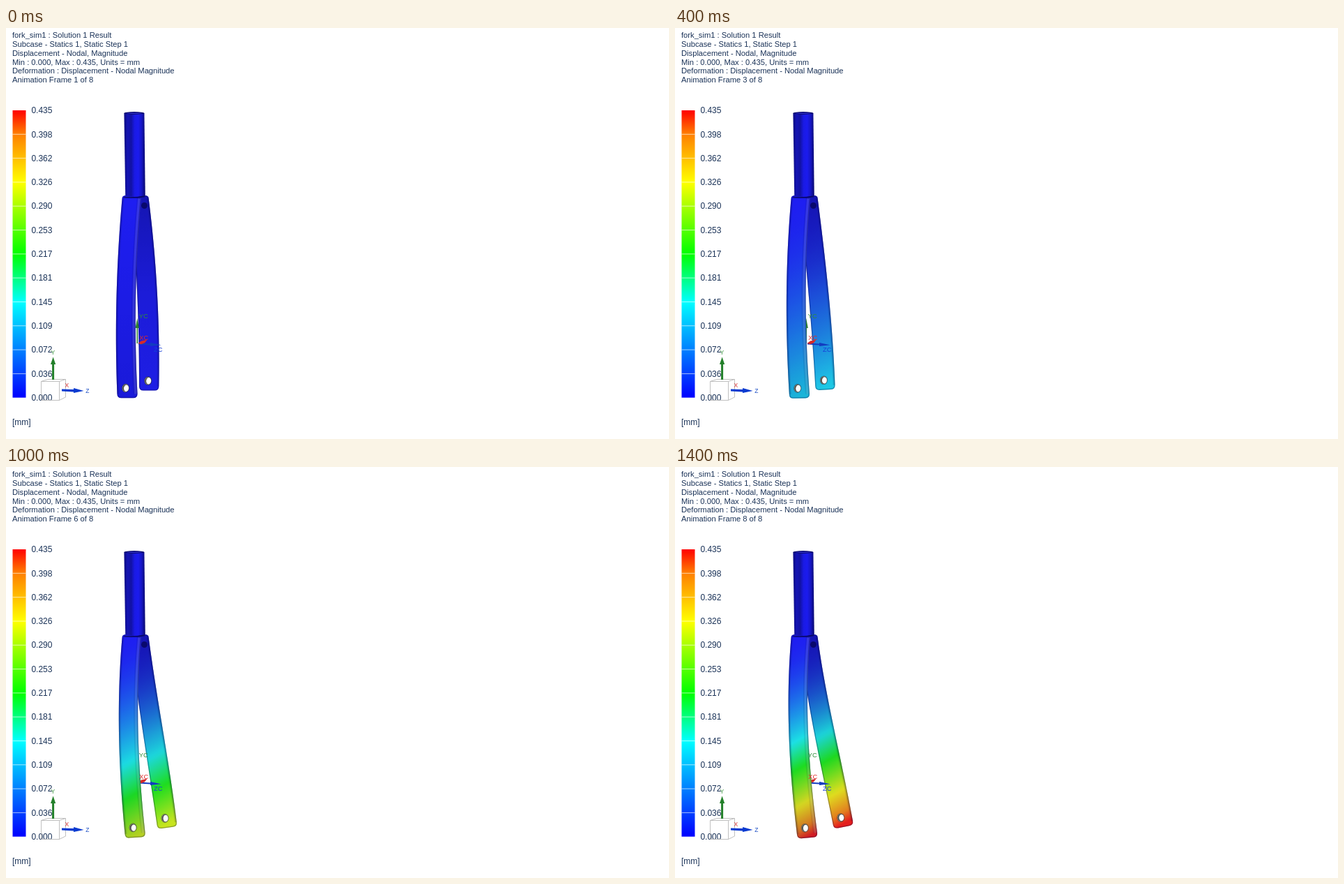
Recreate the animation shown at these times as an HTML page with a canvas. Size 951x589 px, loop 1.6 s.

```html
<!DOCTYPE html>
<html lang="en">
<head>
<meta charset="utf-8">
<title>Fork displacement</title>
<style>
  html, body { margin: 0; width: 100%; height: 100%; overflow: hidden; background: #fff; }
  canvas, svg { position: absolute; left: 0; top: 0; width: 951px; height: 589px; }
  text { font-family: "Liberation Sans", Arial, sans-serif; white-space: pre; }
  .ink { fill: #1b3358; }
</style>
</head>
<body>
<canvas id="view" width="951" height="589"></canvas>
<svg viewBox="0 0 951 589">
  <defs><linearGradient id="scale" x1="0" y1="1" x2="0" y2="0"></linearGradient></defs>
  <rect x="9.5" y="118" width="19" height="411.7" fill="url(#scale)"/>
  <g id="ticks" stroke="#fff" stroke-opacity=".65"></g>
  <g id="words" class="ink"></g>
  <path d="M50.5 506.5H76.5V533.5H50.5ZL60 503.5H85.5L76.5 506.5M85.5 503.5V529L76.5 533.5"
    fill="none" stroke="#b9b9b9" stroke-width=".9"/>
  <path d="M66.1 504V482H64L67.6 471.5L71.2 482H69.1V504Z" fill="#23802a"/>
  <path d="M80 517.4L97 518V516L111.5 520L97 523V521.4L80 520.6Z" fill="#0b3bd0"/>
  <g font-size="8.5">
    <text x="64.6" y="468" fill="#3c9440">Y</text>
    <text x="84.6" y="515" fill="#d83434">X</text>
    <text x="114.2" y="523" fill="#1d4fc4">Z</text>
  </g>
  <g font-size="9.3">
    <text x="190.8" y="416" fill="#2f8f3a">YC</text>
    <text x="191.2" y="447.3" fill="#e02a2a">XC</text>
    <text x="212" y="464" fill="#1740d8">ZC</text>
  </g>
</svg>
<script>
const STEPS = 8, STEP_MS = 200, TOP = 240;
const ctx = document.getElementById('view').getContext('2d');

// Colour scale: value, then red, green, blue
const RAMP = [[0, 0, 0, 255], [1 / 3, 0, 255, 255], [1 / 2, 0, 255, 0],
  [3 / 4, 255, 255, 0], [11 / 12, 255, 128, 0], [1, 255, 0, 0]];
function hue(v, gain = 1, lift = 0) {
  const i = Math.max(1, RAMP.findIndex(r => r[0] >= v));
  const [t0, ...a] = RAMP[i - 1], [t1, ...b] = RAMP[i];
  const k = (v - t0) / (t1 - t0);
  return `rgb(${a.map((c, j) => Math.round((c + (b[j] - c) * k) * gain + lift))})`;
}

// Text and legend
function add(parent, tag, attrs, text = '') {
  const el = document.createElementNS('http://www.w3.org/2000/svg', tag);
  for (const k in attrs) el.setAttribute(k, attrs[k]);
  el.textContent = text;
  return document.getElementById(parent).appendChild(el);
}
const write = (text, x, y, size) => add('words', 'text', { x, y, 'font-size': size }, text);
const header = [
  'fork_sim1 : Solution 1 Result',
  'Subcase - Statics 1, Static Step 1',
  'Displacement - Nodal, Magnitude',
  'Min : 0.000, Max : 0.435, Units = mm',
  'Deformation : Displacement - Nodal Magnitude',
  ''
].map((t, i) => write(t, 9, 14 + i * 12.87, 11.2));
const counter = header.at(-1);
for (let i = 0; i <= 12; i++) {
  const y = 118 + i * 34.31;
  write((0.43455 * (12 - i) / 12).toFixed(3), 36.4, y + 4.2, 12);
  if (i && i < 12) add('ticks', 'path', { d: `M9.5 ${y}H28.5` });
}
write('[mm]', 9, 568.6, 12);
for (const [t] of RAMP) add('scale', 'stop', { offset: t, 'stop-color': hue(t) });

// Legs: edges are parabolas of v, which runs 0 to 1 from crown to foot
const bow = (x, depth, peak) => v => x + depth * (1 - v / peak) ** 2;
const LEFT = {
  len: 290, dx: 16, dy: 1.2, mid: 173, foot: 530.3, gain: 0.83, lift: 30,
  outer: bow(157.8, 8.8, 0.7), inner: bow(185.8, 8, 0.63), hole: [171.5, 516]
};
const RIGHT = {
  len: 275, dx: 36, dy: -3.6, mid: 205, foot: 519.5, gain: 0.78, lift: 30,
  outer: bow(219.6, -15, 0.88), inner: bow(191, -11.5, 1), hole: [203.6, 505.6]
};

// Cantilever deflection and its slope
function bend(leg, y) {
  const u = Math.max(0, (y - TOP) / leg.len);
  return { f: (3 * u * u - u ** 3) / 2, slope: (3 * u - 1.5 * u * u) / leg.len };
}
function warp(leg, s, x, y) {
  const { f, slope } = bend(leg, y);
  return [x + leg.dx * s * f, y + leg.dy * s * f - leg.dx * s * slope * (x - leg.mid)];
}
function edge(leg, s, side) {
  const top = TOP + 4, end = leg.foot - 6, pts = [];
  for (let i = 0; i <= 40; i++) {
    const v = i / 40;
    pts.push(warp(leg, s, leg[side](v), top + (end - top) * v));
  }
  return pts;
}
function trace(path, pts) {
  for (const p of pts) path.lineTo(...p);
  return path;
}
function outline(leg, s, outer, inner) {
  const body = trace(new Path2D(), outer);
  const xo = leg.outer(1), xi = leg.inner(1), r = 6 * Math.sign(xi - xo);
  const at = (x, y) => warp(leg, s, x, y);
  body.quadraticCurveTo(...at(xo, leg.foot), ...at(xo + r, leg.foot));
  body.lineTo(...at(xi - r, leg.foot));
  body.quadraticCurveTo(...at(xi, leg.foot), ...inner.at(-1));
  trace(body, inner.toReversed());
  const [x, y] = outer[0];
  body.lineTo(x + r, y - 4);
  body.quadraticCurveTo(x, y - 4, x, y);
  body.closePath();
  return body;
}
// Colour bands run slightly uphill to the right
function bands(leg, s) {
  const tilt = 0.55, h = 340, y0 = 230, n = 1 + tilt * tilt;
  const g = ctx.createLinearGradient(leg.mid, y0, leg.mid + tilt * h / n, y0 + h / n);
  for (let y = TOP; y <= TOP + leg.len; y += 5) {
    const [px, py] = warp(leg, s, leg.mid, y);
    const t = (py - y0 + tilt * (px - leg.mid)) / h;
    g.addColorStop(Math.min(1, t), hue(Math.min(1, bend(leg, y).f * s), leg.gain, leg.lift));
  }
  return g;
}
function fade(colors, x0, y0, x1, y1) {
  const g = ctx.createLinearGradient(x0, y0, x1, y1);
  colors.forEach((c, i) => g.addColorStop(i / (colors.length - 1), c));
  return g;
}
function line(path, color, width) {
  ctx.strokeStyle = color;
  ctx.lineWidth = width;
  ctx.stroke(path);
}
function disc(x, y, rx, ry, color, rot = 0) {
  ctx.fillStyle = color;
  ctx.beginPath();
  ctx.ellipse(x, y, rx, ry, rot, 0, 7);
  ctx.fill();
}
function shape(d, color) {
  ctx.fillStyle = color;
  ctx.fill(new Path2D(d));
}

function drawLeg(leg, s) {
  const outer = edge(leg, s, 'outer'), inner = edge(leg, s, 'inner');
  const body = outline(leg, s, outer, inner);
  const outEdge = trace(new Path2D(), outer), inEdge = trace(new Path2D(), inner);
  const dark = a => `rgba(0,0,60,${a})`;
  ctx.save();
  ctx.clip(body);
  const shade = leg === LEFT ? [dark(0), dark(0.14)] : [dark(0.3), dark(0.08), dark(0)];
  for (const fill of [bands(leg, s), fade(shade, 0, TOP, 0, leg.foot)]) {
    ctx.fillStyle = fill;
    ctx.fillRect(140, 230, 140, 310);
  }
  if (leg === LEFT) {
    line(inEdge, dark(0.1), 12);
    line(inEdge, 'rgba(255,255,255,.12)', 9);
  } else {
    disc(198.5, 254.5, 4.5, 4.5, dark(0.6));
  }
  line(outEdge, dark(0.14), 6);
  line(body, dark(0.3), 2.6);
  ctx.restore();

  const [x, y] = warp(leg, s, ...leg.hole), rot = 0.1 - leg.dx * s * 0.004;
  disc(x, y, 5.5, 6.3, 'rgba(25,30,50,.6)', rot);
  disc(x, y, 4.9, 5.7, '#8d8f80', rot);
  disc(x + 0.2, y, 4.4, 5.2, '#4c4c48', rot);
  disc(x + 1, y + 0.2, 3.5, 4.7, '#fff', rot);
}
function drawTube() {
  shape('M169.4 122H198.4L199.8 244H171.3Z',
    fade(['#0c0c80', '#1414b4', '#1212a4', '#1a1ae4', '#1b1bee', '#1616c4', '#0a0a70'], 169.5, 0, 199.5, 0));
  disc(183.9, 122, 14.5, 1.9, '#0a0a70');
  disc(183.9, 122.2, 11.5, 0.7, '#2c2cc4');
}
function drawAxes() {
  shape('M187.5 452V430H185.6L188.2 416L190.8 430H189V452Z', '#2b7d30');
  shape('M190 451.6L207 452.6V451L222.5 454.2L207 456V454.6L190 453.4Z', '#123cc0');
  shape('M189.5 452L194 448.6L202.5 446.8L199 451.2L194 453.2Z', '#d42a2a');
}

let shown = -1;
function draw(step) {
  const s = step / (STEPS - 1);
  ctx.clearRect(0, 0, 951, 589);
  drawTube();
  drawLeg(RIGHT, s);
  drawAxes();
  drawLeg(LEFT, s);
  line(new Path2D('M169 242.6Q184 244 199 241.4'), 'rgba(6,6,80,.75)', 1.6);
  counter.textContent = `Animation Frame ${step + 1} of ${STEPS}`;
  shown = step;
}
const start = performance.now();
function tick() {
  const step = Math.floor((performance.now() - start) / STEP_MS) % STEPS;
  if (step !== shown) draw(step);
  requestAnimationFrame(tick);
}
draw(0);
requestAnimationFrame(tick);
</script>
</body>
</html>
```
